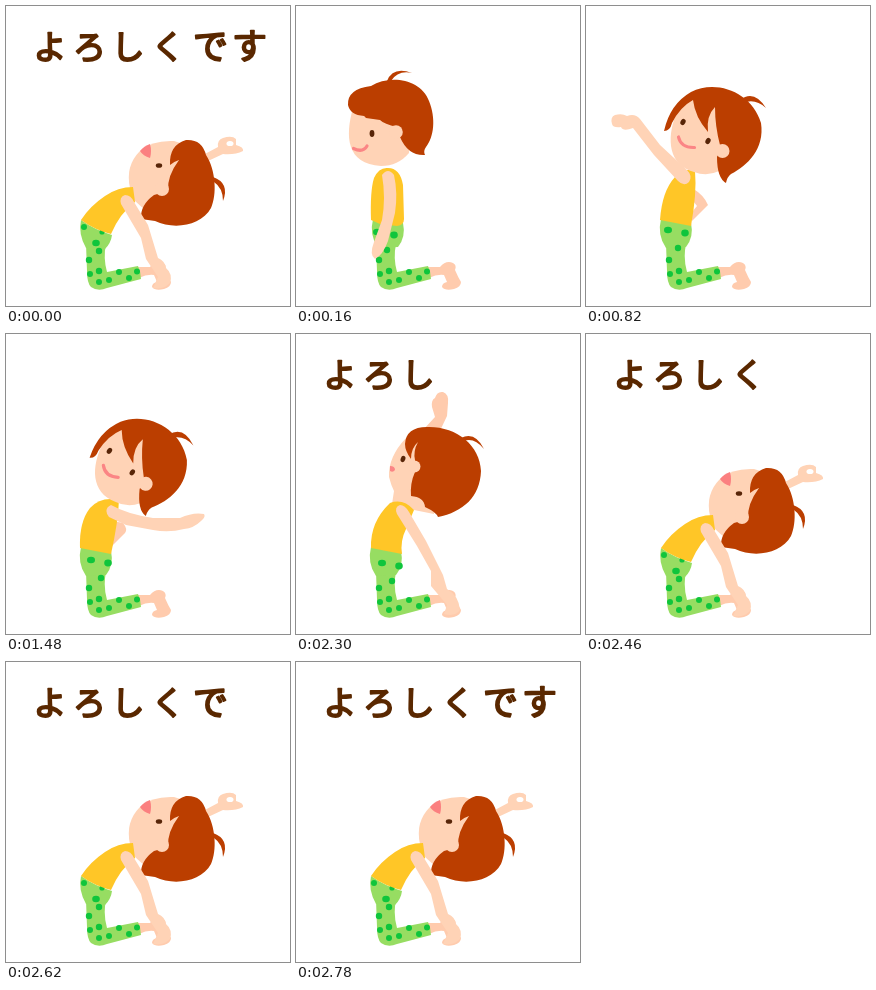
These frames come from a looping animation (284 px wide and 300 px high, 2940 ms). An HTML page:

```html
<!DOCTYPE html>
<html lang="ja">
<head>
<meta charset="utf-8">
<title>よろしくです</title>
<style>
html, body { margin: 0; width: 100%; height: 100%; overflow: hidden; background: #fff; }
svg { display: block; width: 100%; height: 100%; }

.skin { fill: #ffd3b6; }
.far { fill: #ffcbad; }
.hair { fill: #bb3e00; }
.shirt { fill: #ffc627; }
.pants { fill: #97dd62; }
.dots { fill: #0fc53c; }
.eye { fill: #582508; }
.mouth { fill: none; stroke: #fb8585; stroke-width: 3.2; stroke-linecap: round; }

/* Poses and letters switch without blending. */
.pose, .title text { visibility: hidden; animation: 2940ms step-end infinite; }
#kneel { animation-name: kneel; }
#reach { animation-name: reach; }
#swing { animation-name: swing; }
#lean { animation-name: lean; }
#arch { animation-name: arch; }

@keyframes kneel { 0% { visibility: hidden } 5.4422% { visibility: visible } 27.8912%, 100% { visibility: hidden } }
@keyframes reach { 0% { visibility: hidden } 27.8912% { visibility: visible } 50.3401%, 100% { visibility: hidden } }
@keyframes swing { 0% { visibility: hidden } 50.3401% { visibility: visible } 67.3469%, 100% { visibility: hidden } }
@keyframes lean { 0% { visibility: hidden } 67.3469% { visibility: visible } 83.6735%, 100% { visibility: hidden } }
@keyframes arch { 0% { visibility: visible } 5.4422% { visibility: hidden } 83.6735%, 100% { visibility: visible } }

.title {
  font: 400 33px "Noto Sans CJK JP", "Noto Sans CJK", sans-serif;
  fill: #5a2800; stroke: #5a2800; stroke-width: 1.9; stroke-linejoin: round;
  text-anchor: middle;
}
.title text:nth-child(1) { animation-name: c1; }
.title text:nth-child(2) { animation-name: c2; }
.title text:nth-child(3) { animation-name: c3; }
.title text:nth-child(4) { animation-name: arch; }
.title text:nth-child(5) { animation-name: c5; }
.title text:nth-child(6) { animation-name: c6; }
@keyframes c1 { 0% { visibility: visible } 5.4422% { visibility: hidden } 67.3469%, 100% { visibility: visible } }
@keyframes c2 { 0% { visibility: visible } 5.4422% { visibility: hidden } 72.7891%, 100% { visibility: visible } }
@keyframes c3 { 0% { visibility: visible } 5.4422% { visibility: hidden } 78.2313%, 100% { visibility: visible } }
@keyframes c5 { 0% { visibility: visible } 5.4422% { visibility: hidden } 89.1156%, 100% { visibility: visible } }
@keyframes c6 { 0% { visibility: visible } 5.4422% { visibility: hidden } 94.5578%, 100% { visibility: visible } }
</style>
</head>
<body>
<svg viewBox="0 0 284 300">
  <defs>
    <g id="shin">
      <path class="far" d="M132 261 L144 261 Q150 254 157 257 Q161 259 159 264 Q162 271 165 276 Q165 281 158 283 Q149 285 146 281 Q146 277 151 276 L148 269 Q141 268 133 272Z"/>
      <path class="pants" d="M80 238 L100 238 Q97 252 101 266 L132 260 Q135 266 135 273 L101 282 Q92 286 85 281 Q81 277 81 265Z"/>
      <g class="dots">
        <circle cx="83" cy="254" r="3.2"/><circle cx="93" cy="265" r="3.2"/>
        <circle cx="84" cy="268" r="3"/><circle cx="93" cy="276" r="3"/>
        <circle cx="103" cy="274" r="3"/><circle cx="113" cy="266" r="3"/>
        <circle cx="123" cy="272" r="3"/><circle cx="131" cy="265.500" r="3"/>
      </g>
    </g>
    <path id="hips" class="pants" d="M75 213 L105 217 Q108 231 100 241 L80 242 Q71 229 75 213Z"/>
    <g id="spots" class="dots">
      <ellipse cx="82" cy="224" rx="4" ry="3.2"/><ellipse cx="99" cy="227" rx="3.8" ry="3.4"/>
      <circle cx="92" cy="242" r="3.2"/>
    </g>
    <g id="smile">
      <path class="skin" d="M90 108 C80 134 83 159 108 166 Q121 171 133 165 L142 150 L135 96 L106 88Z"/>
      <path class="hair" d="M78 125 Q84 98 105 86 C130 73 166 86 175 117 C179 143 161 160 145 168 Q141 171 140 177 Q131 172 131 151 L134 139 Q129 120 129 101 Q120 110 122 126 Q109 111 107 94 Q94 101 86 117 Q84 125 78 125Z"/>
      <circle class="skin" cx="136.500" cy="145" r="7"/>
      <path class="hair" d="M154 94 Q168 83 180 102 Q169 92 157 97Z"/>
      <ellipse class="eye" cx="97" cy="116" rx="2.400" ry="3.200" transform="rotate(30 97 116)"/>
      <ellipse class="eye" cx="122" cy="135" rx="2.400" ry="3.200" transform="rotate(30 122 135)"/>
      <path class="mouth" d="M92.500 131 Q95 142 108.500 141.500"/>
    </g>
  </defs>

  <g id="kneel" class="pose">
    <use href="#shin"/>
    <use href="#hips" x="2"/>
    <use href="#spots" x="-1" y="2"/>
    <path class="shirt" d="M78 172 Q83 161 92 162 Q104 162 107 179 L108 213 Q108 219 101 220 L84 218 L75 214 Q74 185 78 172Z"/>
    <path class="skin" d="M86 169 Q92 161 98 169 Q102 187 99 207 L92 235 Q87 249 79 253 Q73 249 78 236 L86 214 Q90 192 86 169Z"/>
    <path class="skin" d="M57 102 C49 130 50 158 85 160 Q102 160 113 147 L115 100 L85 82Z"/>
    <path class="hair" d="M52 99 Q51 83 75 80 C94 68 125 73 133 95 C140 112 138 131 130 141 Q127 145 129 149 Q112 150 104 131 L101 121 Q88 118 84 114 L70 112 Q65 107 65 103 L68 110 Q54 109 52 99Z"/>
    <circle class="skin" cx="100" cy="126" r="6.800"/>
    <path class="hair" d="M91 75 Q97 60 116 67 Q102 64 95 75Z"/>
    <ellipse class="eye" cx="76" cy="127.500" rx="2.400" ry="3.400"/>
    <path class="mouth" d="M57.500 142.500 Q67 147 71 140"/>
  </g>

  <g id="reach" class="pose">
    <use href="#shin"/>
    <use href="#hips"/>
    <use href="#spots"/>
    <path class="far" d="M106 182 Q118 189 122 199 L106 215 Q104 207 111 200 L104 191Z"/>
    <path class="shirt" d="M89 171 Q98 161 109 165 Q111 187 105 220 L74 214 Q76 185 89 171Z"/>
    <use href="#smile"/>
    <path class="skin" d="M103 176 Q98 181 92 175 L68 149 L47 122 Q37 126 35 121 Q27 122 26 118 Q24 111 29 109 Q36 107 41 110 Q49 107 54 113 L74 139 L101 164 Q107 170 103 176Z"/>
  </g>

  <g id="swing" class="pose">
    <use href="#shin"/>
    <use href="#hips"/>
    <use href="#spots" x="3" y="2"/>
    <path class="far" d="M107 187 L117 189 Q122 195 119 199 L105 213Z"/>
    <path class="shirt" d="M84 174 Q95 162 113 166 Q112 189 105 220 L74 214 Q73 188 84 174Z"/>
    <use href="#smile" transform="translate(5 4) rotate(6 128 128)"/>
    <path class="skin" d="M105 171 Q121 180 147 184 L174 184 Q187 178 198 180 Q200 183 195 187 Q188 194 178 195 Q163 199 147 196 L120 191 L103 183 Q97 175 105 171Z"/>
  </g>

  <g id="lean" class="pose">
    <use href="#shin"/>
    <use href="#hips"/>
    <use href="#spots" x="4" y="5"/>
    <path class="far" d="M127 96 L139 83 L136 73 Q135 66 139 64 Q141 57 147 58 Q153 60 152 69 L151 82 L142 101Z"/>
    <path class="skin" d="M110 104 Q92 123 93 143 Q95 151 98 157 L96 170 L118 176 L138 180 L140 130 L124 104Z"/>
    <path class="shirt" d="M94 169 Q107 164 118 176 L110 195 Q104 207 106 220 L75 214 Q74 188 94 169Z"/>
    <path class="hair" d="M109 110 Q110 93 131 93 C160 92 184 111 185 137 C184 163 167 178 142 183 Q140 178 129 173 Q128 163 115 162 Q114 149 119 138 L119 126 Q117 117 122 108 Q115 114 115 125 Q109 117 109 110Z"/>
    <circle class="skin" cx="118.500" cy="132.500" r="6"/>
    <path class="hair" d="M165 104 Q179 97 188 115 Q178 103 168 107Z"/>
    <ellipse class="eye" cx="107" cy="125" rx="2.300" ry="3.200" transform="rotate(20 107 125)"/>
    <path d="M94 132 Q99 132 99 136 Q97 139 94 137Z" fill="#fb8585"/>
    <path class="skin" d="M101 180 Q98 173 104 171 Q109 171 113 178 L130 207 L147 241 L151 255 Q163 262 164 276 Q159 283 148 280 L151 271 L135 252 L135 237 L121 212Z"/>
  </g>

  <g id="arch" class="pose">
    <use href="#shin"/>
    <path class="pants" d="M75 214 Q89 224 106 229 Q105 237 99 243 L80 242 Q72 228 75 214Z"/>
    <g class="dots">
      <circle cx="78" cy="221" r="3"/><ellipse cx="90" cy="237" rx="3.800" ry="3.200"/>
      <circle cx="96" cy="226" r="2.600"/><circle cx="93" cy="245" r="3.200"/>
    </g>
    <path class="skin" d="M197 149 L212 141 Q211 134 217 132 Q226 129 230 133 L230 139 Q238 141 237 145 Q229 149 217 148 L202 155Z"/>
    <ellipse cx="224" cy="137.500" rx="3.500" ry="2.600" fill="#fff"/>
    <path class="skin" d="M124 182 Q119 160 134 145 Q146 134 168 135 L190 142 L178 195 L140 205 L128 194Z"/>
    <path class="shirt" d="M99 190 Q112 181 127 181 L129 196 Q114 207 105 228 Q89 224 75 214 Q84 200 99 190Z"/>
    <path class="hair" d="M164 159 Q163 139 180 134 Q196 133 200 149 C210 164 211 189 205 202 C195 220 168 224 149 215 L135 213 Q134 199 148 189 L162 185 Q161 170 173 154 Q167 156 164 159Z"/>
    <circle class="skin" cx="156" cy="183" r="7"/>
    <path class="hair" d="M207 171 Q224 177 217 195 Q217 182 208 176Z"/>
    <ellipse class="eye" cx="153" cy="159.500" rx="3.200" ry="2.300"/>
    <path d="M134 145 Q138 140 144 138 Q146 145 144 152 Q137 150 134 145Z" fill="#fb8080"/>
    <path class="skin" d="M115 198 Q113 191 119 189 Q125 189 128 196 L142 219 L152 252 Q159 255 160 262 Q167 268 164 277 Q158 284 147 282 L152 271 L140 253 L135 232Z"/>
  </g>

  <g class="title">
    <text x="44" y="52.500">よ</text>
    <text x="83.500" y="53">ろ</text>
    <text x="122" y="53">し</text>
    <text x="162" y="53">く</text>
    <text x="204.500" y="53" font-size="35">で</text>
    <text x="243.500" y="53" font-size="35">す</text>
  </g>
</svg>
</body>
</html>
```
